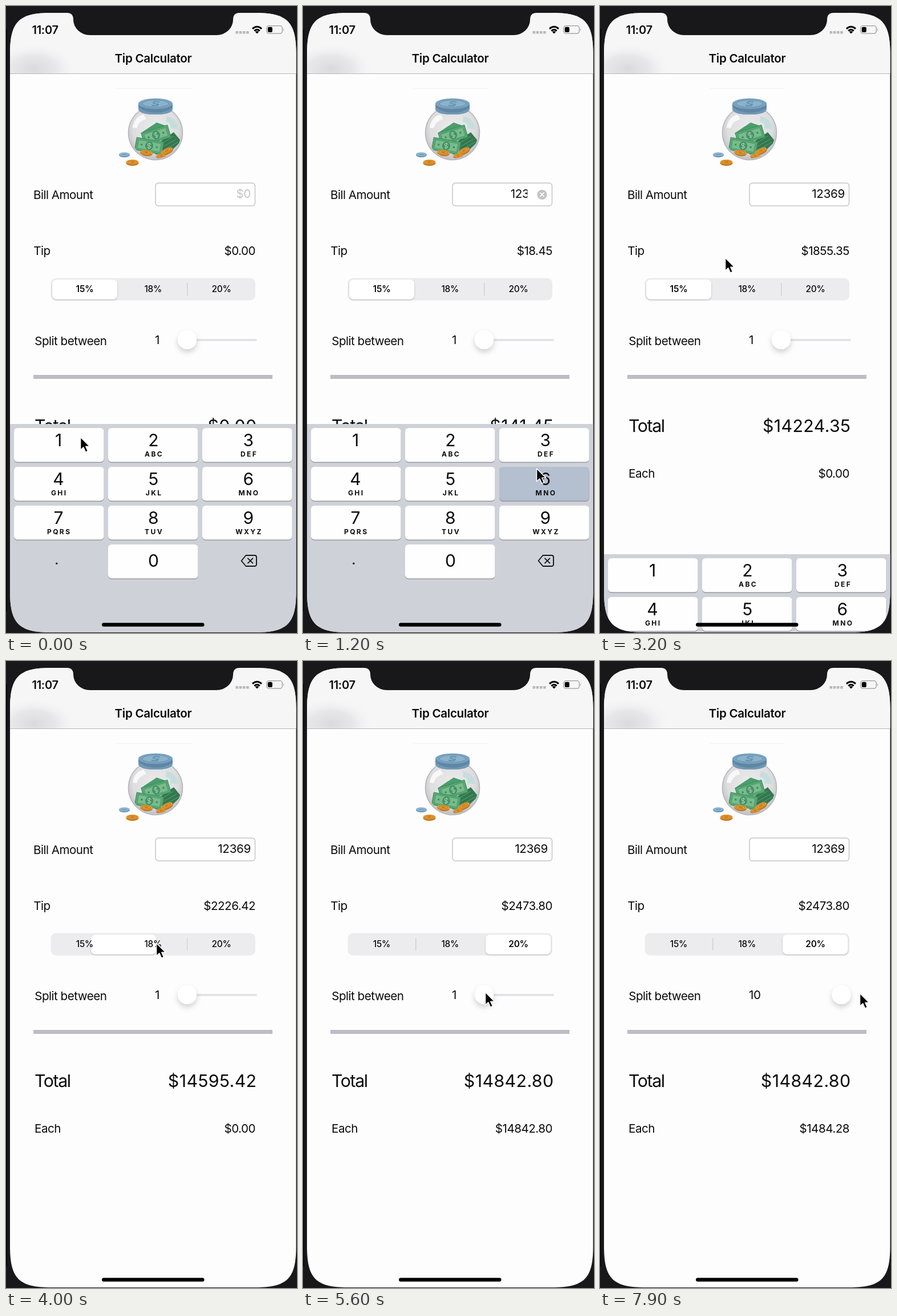
An HTML page for the animation above (8 s loop, 510x1098 px).

```html
<!DOCTYPE html>
<html lang="en">
<head>
<meta charset="utf-8">
<title>Tip Calculator</title>
<style>
  html, body { margin: 0; width: 100%; height: 100%; overflow: hidden; background: #18171a; }
  svg { display: block; width: 100%; height: 100%; }
  text { font-family: Inter, "Open Sans", sans-serif; font-size: 20.6px; letter-spacing: -.5px; fill: #0b0b0c; white-space: pre; }
  .end { text-anchor: end; }
  .mid { text-anchor: middle; }
  .semi { font-weight: 600; letter-spacing: -.3px; }
  .big { font-size: 30.3px; letter-spacing: -1.4px; }
  .sum { font-size: 30.3px; letter-spacing: .4px; }
  .seg { font-size: 15.4px; font-weight: 500; letter-spacing: -.2px; text-anchor: middle; }
  .digit { font-size: 30px; letter-spacing: 0; text-anchor: middle; }
  .letters { font-size: 12px; font-weight: 700; letter-spacing: 2.4px; text-anchor: middle; }
</style>
</head>
<body>
<svg viewBox="0 0 510 1098" preserveAspectRatio="none">
  <defs>
    <clipPath id="screen">
      <path d="M7 84C7 27.5 22.5 12 79 12H436.5C493 12 508.5 27.5 508.5 84V1025C508.5 1081.5 493 1097 436.5 1097H79C22.5 1097 7 1081.5 7 1025Z"/>
    </clipPath>
    <clipPath id="globe"><circle cx="262" cy="222" r="45"/></clipPath>
    <radialGradient id="blur">
      <stop offset="0" stop-color="#dadadc"/><stop offset=".5" stop-color="#e2e2e4" stop-opacity=".75"/>
      <stop offset="1" stop-color="#f6f6f7" stop-opacity="0"/>
    </radialGradient>
    <radialGradient id="glass" cx=".5" cy=".42" r=".55">
      <stop offset="0" stop-color="#ececed"/><stop offset=".75" stop-color="#dedee0"/><stop offset="1" stop-color="#c4c5c9"/>
    </radialGradient>
    <filter id="soft" x="-30%" y="-30%" width="160%" height="180%">
      <feDropShadow dx="0" dy="1.5" stdDeviation="1.5" flood-opacity=".2"/>
    </filter>
    <filter id="lift" x="-50%" y="-50%" width="200%" height="220%">
      <feDropShadow dx="0" dy="5" stdDeviation="5" flood-opacity=".18"/>
    </filter>
    <g id="bill">
      <rect x="-24" y="-11" width="48" height="22" fill="#58a775" stroke="#398a5b"/>
      <rect x="-20" y="-7.5" width="40" height="15" fill="#79bb8c" stroke="#479b67" stroke-width=".8"/>
      <ellipse rx="7" ry="7.5" fill="#459065"/>
      <path d="M3-3Q-3-6-3-2Q-3 0 0 0Q3 0 3 2Q2 5-3 3M0-6V6" fill="none" stroke="#a0d3aa" stroke-width="1.1"/>
      <path d="M-15 0h3m9 0m15 0h3" stroke="#398a5b" stroke-width="3"/>
    </g>
    <g id="coin">
      <ellipse cy="1.2" rx="11" ry="4.7" fill="#bd751b"/>
      <ellipse cy="-.7" rx="11" ry="4.2" fill="#e59a33"/>
      <ellipse cy="-.7" rx="7.5" ry="2.5" fill="none" stroke="#c77d20" stroke-width="1.1"/>
      <path d="M-3-.7h6" stroke="#b76d18" stroke-width="1.5"/>
    </g>
  </defs>

  <rect width="510" height="1098" fill="#18171a"/>
  <path d="M1 40V1060" stroke="#070708" stroke-width="2"/>
  <g clip-path="url(#screen)">
    <rect x="7" y="12" width="502" height="1086" fill="#fefdfe"/>
    <rect x="7" y="12" width="502" height="106" fill="#f6f6f7"/>
    <svg x="7" y="12" width="502" height="106"><ellipse cx="42" cy="98" rx="76" ry="46" fill="url(#blur)"/></svg>
    <path d="M7 118.5H509" stroke="#b5b5b9" stroke-width="1.2"/>
    <text class="mid semi" x="258" y="98.5">Tip Calculator</text>

    <!-- jar -->
    <path d="M192 144.5H324" stroke="#edf4f9" stroke-width="1.2"/>
    <circle cx="262" cy="222" r="47.5" fill="url(#glass)" stroke="#b2b3b8" stroke-width="1.5"/>
    <path d="M222 213Q225 194 241 190L246 198Q233 201 229 214Z" fill="#f8f8f9"/>
    <path d="M281 193Q300 196 302 216L288 214Q290 204 280 203Z" fill="#c5dedd"/>
    <g clip-path="url(#globe)">
      <path d="M268 239L294 221L307 237L286 257L262 260Z" fill="#34774f"/>
      <path d="M271 242L294 228M274 247L299 233M277 252L302 238" stroke="#4c9a69" stroke-width="1.3"/>
      <path d="M237 222L264 204L284 211L246 232Z" fill="#4a9e6b"/>
      <use href="#bill" transform="translate(263 226) rotate(-17)"/>
      <use href="#bill" transform="translate(251 245) rotate(10)"/>
      <use href="#coin" transform="translate(282 254) rotate(-24)"/>
      <use href="#coin" transform="translate(246 257) rotate(6)"/>
      <use href="#coin" transform="translate(272 263) scale(.8)"/>
    </g>
    <path d="M232 170V181Q235 190 262 190Q289 190 292 181V170Z" fill="#5f86a5"/>
    <path d="M232 176V181Q235 190 262 190Q289 190 292 181V178Q280 187 262 187Q240 186 232 176Z" fill="#7399b4"/>
    <ellipse cx="262" cy="171" rx="30" ry="9.2" fill="#79a2bf"/>
    <ellipse cx="262" cy="171" rx="23" ry="6.2" fill="#8bb2cb" stroke="#6792b0"/>
    <path d="M269 168Q258 166 258 170Q262 172 267 172Q267 176 255 174" fill="none" stroke="#6390af" stroke-width="1.8"/>
    <ellipse cx="207.5" cy="261" rx="9.5" ry="4" fill="#608fae"/>
    <ellipse cx="207.5" cy="259.8" rx="9.5" ry="3.5" fill="#8cb5cf"/>
    <path d="M203 260h9" stroke="#6b9aba" stroke-width="1.4"/>
    <use href="#coin" x="221.5" y="274"/>

    <!-- form -->
    <text x="48" y="338">Bill Amount</text>
    <rect x="262" y="310" width="174.5" height="40" rx="5" fill="#fff" stroke="#c5c5c8" stroke-width="1.5"/>
    <text id="amount" class="end" y="336.3" style="letter-spacing:-.3px"></text>
    <rect id="caret" x="393.5" y="319" width="3.5" height="22" fill="#fff"/>
    <g id="clear">
      <circle cx="419" cy="330.3" r="8.6" fill="#c3c3c6"/>
      <path d="M415.8 327.1l6.4 6.4m0-6.4l-6.4 6.4" stroke="#fff" stroke-width="1.7" stroke-linecap="round"/>
    </g>
    <text x="48.3" y="436">Tip</text>
    <text id="tip" class="end" x="437" y="436"></text>

    <rect x="78.5" y="476.5" width="358.5" height="39" rx="9" fill="#ecebed"/>
    <path id="split1" d="M197.7 485V507" stroke="#cfced2" stroke-width="1.3"/>
    <path id="split2" d="M317.7 485V507" stroke="#cfced2" stroke-width="1.3"/>
    <rect id="choice" x="81" y="479" width="114" height="34.5" rx="7.5" fill="#fff" filter="url(#soft)"/>
    <g id="rates"></g>

    <text x="50.3" y="593.5">Split between</text>
    <text id="people" x="261" y="592.3"></text>
    <path id="track" stroke="#e2e1e4" stroke-width="3.8" stroke-linecap="round"/>
    <circle id="knob" cy="584.3" r="16.6" fill="#fff" filter="url(#lift)"/>
    <rect x="48" y="646" width="419" height="7" fill="#bdbdc4"/>
    <text class="big" x="50" y="746">Total</text>
    <text id="total" class="sum end" x="439.5" y="746"></text>
    <text x="50" y="826">Each</text>
    <text id="each" class="end" x="437" y="826"></text>

    <g id="keyboard">
      <rect x="7" y="732" width="502" height="370" fill="#ced2d8"/>
      <g id="keys"></g>
      <text x="88.5" y="977.5" class="mid" style="font-size:26px">.</text>
      <path d="M420.5 962H435.5Q439 962 439 965.5V977.5Q439 981 435.5 981H420.5L412.5 971.5Z" fill="none" stroke="#151516" stroke-width="1.9" stroke-linejoin="round"/>
      <path d="M424 967.3l8.4 8.4m0-8.4l-8.4 8.4" stroke="#151516" stroke-width="1.9" stroke-linecap="round"/>
    </g>
    <rect x="168" y="1080.3" width="179.5" height="6.4" rx="3.2" fill="#000"/>
  </g>

  <!-- notch and status bar -->
  <path d="M107 11V12Q118 12 118 24A29 27 0 0 0 147 51H369A29 27 0 0 0 398 24Q398 12 409 12V11Z" fill="#18171a"/>
  <text class="semi" x="45.5" y="48.8" style="font-size:20px">11:07</text>
  <path d="M402.5 46.3h24" stroke="#b9b9bc" stroke-width="4.4" stroke-dasharray="4.6 1.6"/>
  <g fill="none" stroke="#050505" stroke-width="3">
    <path d="M432 39.8Q440 32.6 448 39.8"/>
    <path d="M435.3 43.6Q440 39.2 444.7 43.6"/>
  </g>
  <path d="M440 48.6l-3.2-3.4q3.2-2.4 6.4 0Z" fill="#050505"/>
  <rect x="456.8" y="34.7" width="27.4" height="13.4" rx="4" fill="none" stroke="#9a9a9d" stroke-width="1.3"/>
  <rect x="458.8" y="36.7" width="8" height="9.4" rx="2" fill="#050505"/>
  <path d="M486 39.3q2.2 2.1 0 4.4Z" fill="#9a9a9d"/>

  <path id="cursor" d="M-.5 0V22.5L4.7 17.7L8.5 26.2L12.5 24.5L8.8 16.2H15.7Z" fill="#050505" stroke="#fff" stroke-width="1.5" stroke-linejoin="round"/>
</svg>
<script>
const LOOP = 8000, STEP = 100;
const $ = id => document.getElementById(id);
const clamp = (v, lo, hi) => Math.min(hi, Math.max(lo, v));

function add(parent, tag, attrs, content = '') {
  const el = document.createElementNS('http://www.w3.org/2000/svg', tag);
  for (const name in attrs) el.setAttribute(name, attrs[name]);
  el.textContent = content;
  return parent.appendChild(el);
}

// Rows are [time, ...values]; values between rows are linear.
function sample(rows, t) {
  const next = rows.findIndex(row => row[0] > t);
  if (next < 0) return rows[rows.length - 1].slice(1);
  if (next === 0) return rows[0].slice(1);
  const a = rows[next - 1], b = rows[next];
  const k = (t - a[0]) / (b[0] - a[0]);
  return a.slice(1).map((v, i) => v + (b[i + 1] - v) * k);
}

const POINTER = [
  [0, 131, 755], [200, 131, 755], [500, 268, 757], [600, 270, 757],
  [800, 402, 757], [900, 404, 758], [1200, 410, 810], [1300, 410, 812],
  [1500, 408, 880], [1600, 406, 880], [1800, 372, 780], [2000, 280, 520],
  [2100, 266, 487], [2300, 264, 485], [2700, 220, 441], [3300, 220, 441],
  [3700, 264, 494], [4400, 264, 494], [4700, 366, 502], [5000, 366, 502],
  [5400, 320, 580], [5800, 320, 580], [7600, 450, 582], [7900, 456, 582]
];
const SLIDE = [[2900, 0], [3000, 22], [3100, 112], [3200, 228], [3300, 302],
  [3400, 340], [3500, 357], [3600, 364], [3700, 368]];
const CHOICE = [[3800, 0], [3900, .15], [4000, .57], [4100, .87], [4200, .97], [4300, 1],
  [4800, 1], [4900, 1.15], [5000, 1.57], [5100, 1.87], [5200, 1.97], [5300, 2]];
const TAPS = [[100, 1], [500, 2], [800, 3], [1200, 6], [1500, 9]];
const RATES = [15, 18, 20];

const letters = ['', 'ABC', 'DEF', 'GHI', 'JKL', 'MNO', 'PQRS', 'TUV', 'WXYZ'];
const keys = {};
function addKey(digit, col, row, label) {
  const x = 14 + col * 165, y = 739 + row * 68, mid = 92 + col * 166.4;
  const box = { x, y, width: 157.5, height: 59.5, rx: 6 };
  add($('keys'), 'rect', { ...box, y: y + 1.3, fill: '#898b90' });
  keys[digit] = add($('keys'), 'rect', { ...box, fill: '#fefefe' });
  add($('keys'), 'text', { class: 'digit', x: mid, y: y + (digit ? 32 : 39) }, digit);
  add($('keys'), 'text', { class: 'letters', x: mid + 1.2, y: y + 49.5 }, label);
}
letters.forEach((label, i) => addKey(i + 1, i % 3, Math.floor(i / 3), label));
addKey(0, 1, 3, '');

const rateLabels = RATES.map((rate, i) =>
  add($('rates'), 'text', { class: 'seg', x: 138 + i * 119.8, y: 501.3 }, rate + '%'));

function setText(id, value) {
  if ($(id).textContent !== value) $(id).textContent = value;
}
const money = v => '$' + v.toFixed(2);

function draw(t) {
  const [px, py] = sample(POINTER, t);
  $('cursor').setAttribute('transform', `translate(${px} ${py})`);
  $('keyboard').setAttribute('transform', `translate(0 ${sample(SLIDE, t)[0]})`);

  // A digit is entered when its key is released.
  const typed = TAPS.filter(([at]) => t >= at + STEP).map(tap => tap[1]).join('');
  for (const [at, digit] of TAPS)
    keys[digit].setAttribute('fill', t >= at && t < at + STEP ? '#b4bfcf' : '#fefefe');

  const editing = typed !== '' && t < 3000;
  setText('amount', typed || '$0');
  $('amount').setAttribute('x', editing ? 396.5 : 429);
  $('amount').style.fill = typed ? '' : '#c3c3c7';
  $('clear').style.display = editing ? '' : 'none';
  $('caret').style.display = editing && t < 2800 ? '' : 'none';

  const [pos] = sample(CHOICE, t);
  const chosen = t < 3900 ? 0 : t < 4900 ? 1 : 2;
  $('choice').setAttribute('x', 81 + pos * 119.6);
  $('split1').style.opacity = clamp(2 * (pos - 1), 0, 1);
  $('split2').style.opacity = clamp(2 * (1 - pos), 0, 1);
  rateLabels.forEach((label, i) => label.style.fontWeight = i === pos ? 600 : 500);

  const knob = t < 5800 ? 317.5 : clamp(px - 2.5, 317.5, 423);
  const people = Math.floor(1 + 9 * (knob - 317.5) / 105.5);
  $('knob').setAttribute('cx', knob);
  $('track').setAttribute('d', `M${knob} 584.8H438`);
  $('track').style.display = knob < 423 ? '' : 'none';
  setText('people', String(people));

  const bill = Number(typed), tip = bill * RATES[chosen] / 100;
  setText('tip', money(tip));
  setText('total', money(bill + tip));
  setText('each', money(t < 5500 ? 0 : (bill + tip) / people));
}

const start = performance.now();
function tick() {
  const t = (performance.now() - start) % LOOP;
  draw(Math.floor(t / STEP) * STEP);
  requestAnimationFrame(tick);
}
tick();
</script>
</body>
</html>
```
